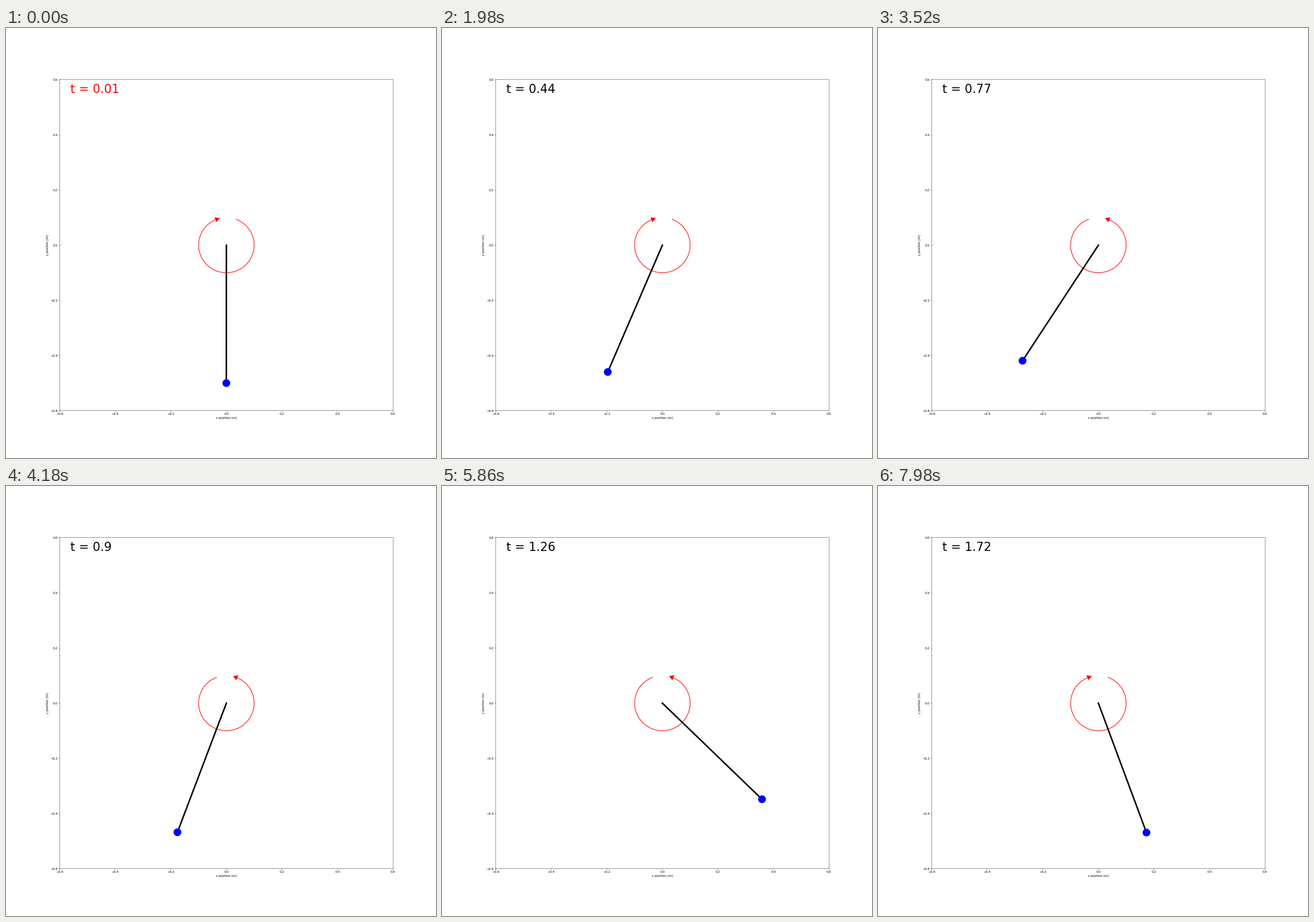
Animation of 748 by 748 pixels, one loop 8000 ms. Source, as a matplotlib script:

```python
import math

import matplotlib.pyplot as plt
from matplotlib.animation import FuncAnimation
from matplotlib.patches import Arc, Circle, RegularPolygon

LENGTH = 0.5            # rod length [m]
RADIUS = 0.1            # torque arrow radius [m]
GRAVITY = 9.81 / LENGTH
DAMPING = 0.7
TORQUE = 6.335          # per unit of inertia
FLIPS = (0.7285, 1.421)  # the torque is counterclockwise between these times
POSES = 172
DT = 0.01               # simulated time per pose [s]
SUBSTEPS = 100


def is_counter(t):
    return FLIPS[0] <= t < FLIPS[1]


def simulate():
    """Damped pendulum swung by a constant torque that changes sign."""
    angle = rate = t = 0.0
    h = DT / SUBSTEPS
    angles = []
    for _ in range(POSES):
        for _ in range(SUBSTEPS):
            torque = TORQUE if is_counter(t) else -TORQUE
            rate += h * (torque - GRAVITY * math.sin(angle) - DAMPING * rate)
            angle += h * rate
            t += h
        angles.append(angle)
    return angles


def pose_index(ms):
    """Poses are held for 20, 100 and 20 ms in turn."""
    cycle, rest = divmod(ms, 140)
    return 3 * cycle + (rest >= 20) + (rest >= 120)


plt.rcParams["path.snap"] = False
fig, ax = plt.subplots(figsize=(20, 20), dpi=37.4)
ax.set(xlim=(-0.6, 0.6), ylim=(-0.6, 0.6),
       xlabel="x position [m]", ylabel="y position [m]")
ticks = [round(0.2 * i, 1) for i in range(-3, 4)]
ax.set_xticks(ticks)
ax.set_yticks(ticks)

ax.add_patch(Arc((0, 0), 2 * RADIUS, 2 * RADIUS, theta1=110, theta2=70,
                 color="red", lw=2))
head = ax.add_patch(RegularPolygon((0, 0), 3, radius=RADIUS / 10, color="red"))
rod, = ax.plot([], [], color="black", lw=5)
bob = ax.add_patch(Circle((0, 0), 0.014, fc="blue", lw=0, zorder=3))
clock = ax.text(0.032, 0.96, "", fontsize=40, transform=ax.transAxes)

angles = simulate()


def update(frame):
    k = pose_index(20 * frame)
    t = round((k + 1) * DT, 2)

    x, y = LENGTH * math.sin(angles[k]), -LENGTH * math.cos(angles[k])
    rod.set_data([0, x], [0, y])
    bob.center = (x, y)

    counter = is_counter(t)
    end = math.radians(70 if counter else 110)
    head.xy = (RADIUS * math.cos(end), RADIUS * math.sin(end))
    head.orientation = math.radians(70 if counter else -70)

    clock.set_text(f"t = {t}")
    clock.set_color("red" if k == 0 else "black")
    return head, rod, bob, clock


anim = FuncAnimation(fig, update, frames=400, interval=20, repeat=True)
plt.show()
```
